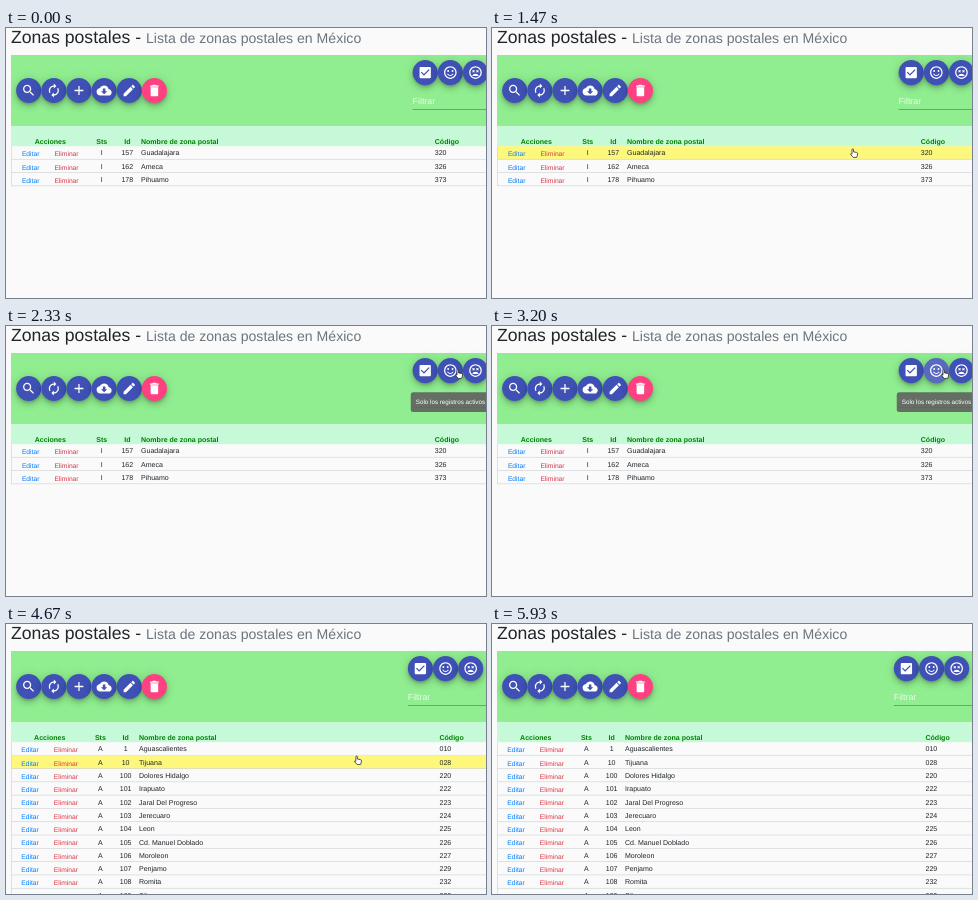
An HTML page that plays this animation: 480x270 px, repeating every 6.39 s.

```html
<!DOCTYPE html>
<html lang="es">
<head>
<meta charset="utf-8">
<title>Zonas postales</title>
<style>
html, body { margin: 0; width: 100%; height: 100%; overflow: hidden; background: #fafafa; }
svg { display: block; width: 480px; height: 270px; }
text { font-family: "Liberation Sans", Arial, sans-serif; text-rendering: geometricPrecision; white-space: pre; }
</style>
</head>
<body>
<svg id="stage" viewBox="0 0 480 270"></svg>
<script>
const LOOP = 6390, STEP = 1000 / 15;
const TOP = 118.2, PITCH = 13.3, R = 12.55;
const INK = '#212529', INDIGO = '#3f51b5', PINK = '#ff4081';
const stage = document.getElementById('stage');

const FACE = 'M11.99 2C6.47 2 2 6.48 2 12s4.47 10 9.99 10C17.52 22 22 17.52 22 12S17.52 2 11.99 2zM12 20c-4.42 0-8-3.58-8-8s3.58-8 8-8 8 3.58 8 8-3.58 8-8 8z';
const ICON = {
  search: 'M15.5 14h-.79l-.28-.27C15.41 12.59 16 11.11 16 9.5 16 5.91 13.09 3 9.5 3S3 5.91 3 9.5 5.91 16 9.5 16c1.61 0 3.09-.59 4.23-1.57l.27.28v.79l5 4.99L20.49 19l-4.99-5zm-6 0C7.01 14 5 11.99 5 9.5S7.01 5 9.5 5 14 7.01 14 9.5 11.99 14 9.5 14z',
  renew: 'M12 6v3l4-4-4-4v3c-4.42 0-8 3.58-8 8 0 1.57.46 3.03 1.24 4.26L6.7 14.8c-.45-.83-.7-1.79-.7-2.8 0-3.31 2.69-6 6-6zm6.76 1.74L17.3 9.2c.44.84.7 1.79.7 2.8 0 3.31-2.69 6-6 6v-3l-4 4 4 4v-3c4.42 0 8-3.58 8-8 0-1.57-.46-3.03-1.24-4.26z',
  add: 'M19 13h-6v6h-2v-6H5v-2h6V5h2v6h6v2z',
  cloud: 'M19.35 10.04C18.67 6.59 15.64 4 12 4 9.11 4 6.6 5.64 5.35 8.04 2.34 8.36 0 10.91 0 14c0 3.31 2.69 6 6 6h13c2.76 0 5-2.24 5-5 0-2.64-2.05-4.78-4.65-4.96zM17 13l-5 5-5-5h3V9h4v4h3z',
  edit: 'M3 17.25V21h3.75L17.81 9.94l-3.75-3.75L3 17.25zM20.71 7.04c.39-.39.39-1.02 0-1.41l-2.34-2.34c-.39-.39-1.02-.39-1.41 0l-1.83 1.83 3.75 3.75 1.83-1.83z',
  trash: 'M6 19c0 1.1.9 2 2 2h8c1.1 0 2-.9 2-2V7H6v12zM19 4h-3.5l-1-1h-5l-1 1H5v2h14V4z',
  check: 'M19 3H5c-1.11 0-2 .9-2 2v14c0 1.1.89 2 2 2h14c1.11 0 2-.9 2-2V5c0-1.1-.89-2-2-2zm-9 14l-5-5 1.41-1.41L10 14.17l7.59-7.59L19 8l-9 9z',
  smile: FACE + 'M12 16c-1.48 0-2.75-.81-3.45-2H6.88c.8 2.05 2.79 3.5 5.12 3.5s4.32-1.45 5.12-3.5h-1.67c-.7 1.19-1.97 2-3.45 2zM7 9.5a1.5 1.5 0 1 0 3 0a1.5 1.5 0 1 0-3 0zM14 9.5a1.5 1.5 0 1 0 3 0a1.5 1.5 0 1 0-3 0z',
  sad: FACE + 'M12 14c-2.33 0-4.31 1.46-5.11 3.5h10.22c-.8-2.04-2.78-3.5-5.11-3.5zM7.82 12l1.06-1.06L9.94 12 11 10.94 9.94 9.88 11 8.82 9.94 7.76 8.88 8.82 7.82 7.76 6.76 8.82l1.06 1.06-1.06 1.06zM14.06 12l1.06-1.06L16.18 12l1.06-1.06-1.06-1.06 1.06-1.06-1.06-1.06-1.06 1.06-1.06-1.06L13 8.82l1.06 1.06L13 10.94z'
};

function el(parent, tag, attrs, content) {
  const node = document.createElementNS('http://www.w3.org/2000/svg', tag);
  for (const k in attrs) node.setAttribute(k, attrs[k]);
  if (content) node.textContent = content;
  return parent.appendChild(node);
}
const group = (parent, attrs) => el(parent, 'g', attrs);
const rect = (parent, x, y, width, height, fill, rx = 0) =>
  el(parent, 'rect', { x, y, width, height, fill, rx });
const label = (parent, x, y, size, str, fill, attrs) =>
  el(parent, 'text', { x, y, 'font-size': size, fill, ...attrs }, str);
const show = (node, on) => { node.style.visibility = on ? 'visible' : 'hidden'; };

// Shadow layers: offset, blur, spread, alpha
const SHADOW = [[1.9, 1.55, -.6, .2], [3.8, 3.1, 0, .14], [.6, 5.6, 0, .12]];
function button(parent, cx, cy, icon, fill = INDIGO) {
  const g = group(parent, { transform: `translate(${cx} ${cy})` });
  for (const [cy, blur, spread, alpha] of SHADOW)
    el(g, 'circle', { cy, r: R + spread, opacity: alpha, style: `filter:blur(${blur}px)` });
  el(g, 'circle', { r: R, fill });
  el(g, 'path', { d: ICON[icon], fill: '#fff', transform: 'scale(.6286) translate(-12 -12)' });
}

const MID = { 'text-anchor': 'middle' }, BOLD = { 'font-weight': 700 };

function buildView({ shift, cols, rows }) {
  const [actions, edit, del, sts, id, name, code] = cols;
  const g = group(stage);
  const head = (x, str, attrs) => label(g, x, 115.5, 7.04, str, 'green', { ...BOLD, ...attrs });
  head(actions, 'Acciones', MID);
  head(sts, 'Sts', MID);
  head(id, 'Id', MID);
  head(name, 'Nombre de zona postal');
  head(code, 'Código');

  const bands = rows.map((row, i) => {
    const y = TOP + i * PITCH, base = y + 9.2;
    const band = rect(g, 5, y, 475, PITCH, '#fdf87c');
    rect(g, 5, y + PITCH - .6, 475, .65, '#cfd3d6');
    label(g, edit, base + .8, 6.7, 'Editar', '#007bff');
    label(g, del, base + .8, 6.7, 'Eliminar', '#dc3545');
    const cell = (x, str, attrs) => label(g, x, base, 7.04, str, INK, attrs);
    cell(sts, row[0], MID);
    cell(id, row[1], MID);
    cell(name, row[2]);
    cell(code, row[3]);
    return band;
  });
  rect(g, 5, TOP, .65, rows.length * PITCH, '#cfd3d6');

  ['check', 'smile', 'sad'].forEach((icon, i) => button(g, 419.2 + shift + i * 25.14, 44.6, icon));
  label(g, 406.6 + shift, 76.3, 8.8, 'Filtrar', '#fff', { opacity: .8 });
  rect(g, 406.6 + shift, 81, 80, .7, 'rgba(0,0,0,.42)');
  return { g, bands };
}

function buildTip(cx, width, str) {
  const g = group(stage);
  rect(g, cx - width / 2, 66.3, width, 19.6, 'rgba(97,97,97,.9)', 2.5);
  label(g, cx - width / 2 + 5, 78.3, 6.28, str, '#fff');
  return g;
}

// Static page
label(stage, 5, 15.3, 17.6, 'Zonas postales -', INK);
label(stage, 140, 15.3, 14.08, 'Lista de zonas postales en México', '#6c757d');
rect(stage, 5, 27, 475, 71.2, '#90ee90');
rect(stage, 5, 98.2, 475, 20, '#c6f9d8');
['search', 'renew', 'add', 'cloud', 'edit', 'trash'].forEach((icon, i) =>
  button(stage, 22.7 + i * 25.14, 62.5, icon, icon === 'trash' ? PINK : INDIGO));

const before = buildView({
  shift: 0,
  cols: [44.3, 15.9, 48.4, 95.7, 121.3, 135, 428.8],
  rows: [['I', 157, 'Guadalajara', '320'], ['I', 162, 'Ameca', '326'], ['I', 178, 'Pihuamo', '373']]
});
const after = buildView({
  shift: -4.8,
  cols: [43.7, 15.3, 47.8, 94.4, 119.6, 133, 433.5],
  rows: [
    ['A', 1, 'Aguascalientes', '010'], ['A', 10, 'Tijuana', '028'],
    ['A', 100, 'Dolores Hidalgo', '220'], ['A', 101, 'Irapuato', '222'],
    ['A', 102, 'Jaral Del Progreso', '223'], ['A', 103, 'Jerecuaro', '224'],
    ['A', 104, 'Leon', '225'], ['A', 105, 'Cd. Manuel Doblado', '226'],
    ['A', 106, 'Moroleon', '227'], ['A', 107, 'Penjamo', '229'],
    ['A', 108, 'Romita', '232'], ['A', 109, 'Silao', '233']
  ]
});

const clip = el(stage, 'clipPath', { id: 'fab' });
el(clip, 'circle', { cx: 444.4, cy: 44.6, r: R });
const ripple = el(group(stage, { 'clip-path': 'url(#fab)' }), 'circle', { cx: 451, cy: 44, fill: '#fff' });

const tipActive = buildTip(444.5, 79.5, 'Solo los registros activos');
const tipInactive = buildTip(464.4, 84.4, 'Solo los registros inactivos');

const cursor = group(stage);
const outline = { fill: '#fff', stroke: '#222', 'stroke-width': .75, 'stroke-linejoin': 'round' };
const hand = el(cursor, 'path', { ...outline,
  d: 'M2 5V1.1a.75.75 0 0 1 1.5 0V3.4l3 .5q1.2.3 1.1 1.5l-.4 2-.5 1.5H3.3L.5 5.9q.2-1.4 1.5-.2z' });
const arrow = el(cursor, 'path', { ...outline, d: 'M2.5 0v8.2l1.9-1.8 1.3 2.9 1.2-.5-1.3-2.8h2.6z' });

// Pointer path: time, x, y
const PATH = [
  [333, 474, 188], [933, 380, 124], [1000, 380, 124], [1267, 359, 121], [1400, 359, 121],
  [1466, 358, 120.5], [2067, 449, 43.5], [4400, 449, 43.5], [4800, 312.5, 162.5],
  [5066, 312.5, 162.5], [5667, 481, 211]
];
const clamp = v => Math.max(0, Math.min(1, v));
const ramp = (t, from, to) => clamp((t - from) / (to - from));
const ease = p => p * p * (3 - 2 * p);

function pointer(t) {
  let i = 0;
  while (i < PATH.length - 2 && t >= PATH[i + 1][0]) i++;
  const [t0, x0, y0] = PATH[i], [t1, x1, y1] = PATH[i + 1];
  const p = ease(ramp(t, t0, t1));
  return [x0 + (x1 - x0) * p, y0 + (y1 - y0) * p];
}

function render(ms) {
  const t = Math.floor((ms + 4) / STEP) * STEP;
  const loaded = t > 3860;
  const view = loaded ? after : before;
  before.g.style.display = loaded ? 'none' : '';
  after.g.style.display = loaded ? '' : 'none';

  const active = t > 330 && t < 5660;
  const [x, y] = pointer(t);
  const row = active ? Math.floor((y - TOP) / PITCH) : -1;
  view.bands.forEach((band, i) => { band.style.display = i === row ? '' : 'none'; });

  const first = 419.2 + (loaded ? -4.8 : 0);
  const onButton = [0, 1, 2].some(i => Math.hypot(x + 2.7 - first - i * 25.14, y - 44.6) < R);
  const pointing = onButton || (row >= 0 && row < view.bands.length);
  cursor.setAttribute('transform', `translate(${x} ${y})`);
  show(hand, active && pointing);
  show(arrow, active && !pointing);

  tipActive.setAttribute('opacity', loaded ? 0 : ramp(t, 2080, 2260));
  tipInactive.setAttribute('opacity', ramp(t, 3900, 4080) * (1 - ramp(t, 4420, 4540)));
  ripple.setAttribute('r', 24 * ease(ramp(t, 2790, 3130)));
  ripple.setAttribute('opacity', .14 * (1 - ramp(t, 3200, 3470)));
}

const start = performance.now();
function loop() {
  render((performance.now() - start) % LOOP);
  requestAnimationFrame(loop);
}
loop();
</script>
</body>
</html>
```
